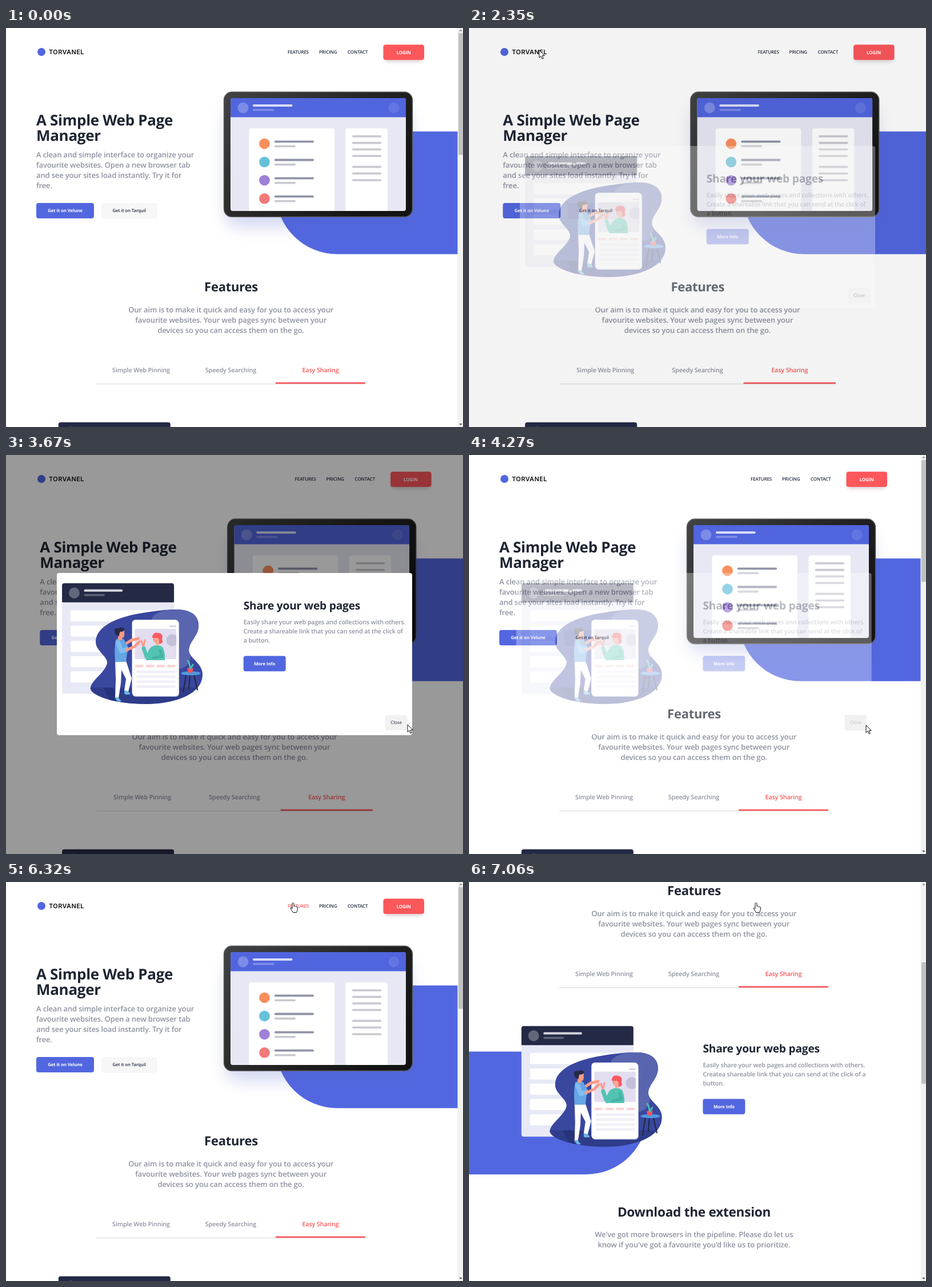
These frames come from a looping animation (800 px wide and 700 px high, 8000 ms). An HTML page:

```html
<!DOCTYPE html>
<html lang="en">
<head>
<meta charset="utf-8">
<title>Landing page demo</title>
<style>
html, body { margin: 0; width: 100%; height: 100%; overflow: hidden; background: #fff; }
svg { display: block; width: 800px; height: 700px; }
text { font-family: 'Open Sans', 'Noto Sans', sans-serif; font-weight: 600; letter-spacing: -.0115em; text-rendering: geometricPrecision; fill: #252b3f; }
.h { font-weight: 700; fill: #1e2533; }
.p { fill: #8f92a0; }
.w { fill: #fff; font-weight: 700; }
.mid { text-anchor: middle; }
.red { fill: #fa5757; }
.logo { font-family: Inter, sans-serif; letter-spacing: .4px; fill: #111; }
</style>
</head>
<body>
<svg id="stage" viewBox="0 0 800 700" xmlns="http://www.w3.org/2000/svg"></svg>
<script>
const BLUE = '#5267df', RED = '#fc575b', NAVY = '#242a45';
const stage = document.getElementById('stage');

const text = (x, y, s, size, cls = '', extra = '') =>
  `<text x="${x}" y="${y}" font-size="${size}" class="${cls}" ${extra}>${s}</text>`;
const lines = (x, y, gap, rows, size, cls) =>
  rows.map((s, i) => text(x, y + i * gap, s, size, cls)).join('');
const rect = (x, y, w, h, fill, r = 0, extra = '') =>
  `<rect x="${x}" y="${y}" width="${w}" height="${h}" rx="${r}" fill="${fill}" ${extra}/>`;
const bar = (x, y, w, h, fill, extra) => rect(x, y - h / 2, w, h, fill, h / 2.4, extra);
const dot = (x, y, r, fill, extra = '') => `<circle cx="${x}" cy="${y}" r="${r}" fill="${fill}" ${extra}/>`;
const path = (d, fill, extra = '') => `<path d="${d}" fill="${fill}" ${extra}/>`;
const limb = (d, color, w) =>
  path(d, 'none', `stroke="${color}" stroke-width="${w}" stroke-linecap="round" stroke-linejoin="round"`);

const BLOB = 'M59 103C59 80 85 64 125 55C150 50 178 46 200 46C226 46 240 57 239 76C238 93 222 103 222 118C223 132 246 140 246 160C246 188 215 204 175 210C140 214 100 211 72 201C56 195 48 188 50 182C54 168 78 154 79 139C79 128 59 118 59 103Z';

function tablet() {
  const items = ['#fa8f5c', '#66c0da', '#9f80d8', '#f27a78'].map((c, i) => {
    const y = 203 + i * 32.1;
    return dot(452.5, y, 9.3, c) + bar(470, y - 3.6, 69, 3.8, '#9194a6') + bar(470, y + 4.5, 37, 3.6, '#c8c8d0');
  }).join('');
  const side = [190, 201.6, 213, 224.5, 243.6, 255.2, 267].map(y => bar(606, y, 51, 3.6, '#c8c8d0')).join('');
  return rect(385, 140, 322, 208, '#5063c8', 20, 'opacity=".26" filter="url(#soft)"') +
    rect(381.5, 112.3, 330, 219, 'url(#frame)', 14, 'stroke="#5a5b5d" stroke-width="1.4"') +
    `<g clip-path="url(#screen)">` +
    rect(393, 123, 307, 198, '#e8e8f4') + rect(393, 123, 307, 33.5, '#5165de') +
    dot(415, 140, 9.5, '#fff', 'opacity=".25"') + dot(679, 140, 9.5, '#fff', 'opacity=".1"') +
    bar(432, 136, 69.5, 4, '#d9ddf9') + bar(432, 143.7, 37.5, 3.6, '#7f8de7') +
    rect(425.5, 176, 149.5, 160, '#fff', 4) + rect(594.5, 176, 73.5, 160, '#fff', 4) +
    items + side + '</g>';
}

function man() {
  return path('M93 136L112 136L122 167L116 190L109 188L112 168L104 152L103 175L99 201L93 200L94 168Z', '#fff') +
    path('M92 200l7 1l5 6q-6 2-9-2z', '#6ab4e8') + path('M109 188l7 2l4 4q-6 3-11 0z', '#6ab4e8') +
    limb('M112 106L121 100L134 97', '#fb9a86', 5) +
    path('M94 99Q101 94 108 98L116 112Q113 126 112 138L93 138Q91 115 94 99Z', '#64a5e6') +
    limb('M98 104L104 119L113 116', '#82bdf0', 8) + limb('M113 117L127 111L135 103', '#fb9a86', 5) +
    rect(98, 90, 7, 10, '#fb9a86', 3) + path('M97 83h12v9q-1 5-6 4q-6-2-6-8z', '#fb9a86') +
    path('M92 84Q91 78 98 79Q107 76 109 80Q110 85 102 85Q100 87 100 93Q93 92 92 84Z', '#252a45');
}

function woman() {
  return dot(193, 100, 10.5, '#c4c0da', 'clip-path="url(#photo)"') +
    path('M147 135Q149 117 157 111Q168 106 176 112Q181 121 180 135Z', '#52c3b2') +
    limb('M155 121L148 129L143 114', '#52c3b2', 7) + limb('M172 118L175 128L160 131', '#46b3a3', 5) +
    limb('M142 110L139 101M143 109L145 100', '#fb9a86', 3) +
    path('M160 95Q158 85 168 87Q178 88 175 98Q178 105 172 106Q164 108 160 100Z', '#fa5a62') +
    path('M161 96h9v11q-4 4-6 0v-3q-4 0-3-8z', '#fba792') +
    path('M158 96Q157 87 168 88Q176 90 173 99Q168 99 167 94Z', '#fa5a62');
}

function picture() {
  const slots = [47.3, 74.2, 101, 127.8, 154.6].map(y => rect(15, y, 166, 19.5, '#fff', 3)).join('');
  const tags = [128, 147, 165.5, 184].map(x => bar(x, 145.3, 14.5, 4.4, '#fbd3d5')).join('');
  const rows = [155.5, 164, 172.8, 181.3].map(y => bar(130, y, 69, 4.4, '#f1eff8')).join('');
  return rect(0, 0, 196, 194, '#e8e9f6', 4) +
    path('M0 33.5V4Q0 0 4 0H192Q196 0 196 4V33.5Z', NAVY) +
    dot(21.3, 17, 9.5, '#62677a') + bar(38.5, 12.8, 67.5, 4, '#d4d5db') + bar(38.5, 20.7, 36, 3.6, '#5e6377') + slots +
    `<g clip-path="url(#blob)">` + rect(40, 40, 215, 180, '#39479f') +
    path('M157 62C165 40 250 35 245 80C240 102 222 103 225 120C228 140 214 150 205 150L160 100Z', '#5965ae') +
    rect(40, 183, 215, 40, '#2e3c8a') + path('M72 183L88 183L104 206L84 206Z', '#26327a') + '</g>' +
    rect(123, 65, 82, 134, '#cfd0e6', 6) + rect(122.5, 64, 81.5, 133.5, '#fff', 6) +
    bar(188, 75.5, 12, 3.2, '#d9d6ea') + rect(127.5, 80, 72.5, 53, '#e2ddef', 1) +
    woman() + tags + rows + man() +
    limb('M217 161L212 191M224 161L222 184M231 161L237 187', NAVY, 2.2) +
    `<ellipse cx="225.5" cy="158" rx="17" ry="3.6" fill="#4f9ae2"/>` +
    path('M219 149h11l-2 8h-7z', '#f5565f') +
    limb('M224 149Q224 141 220 136M225 149Q228 145 229 143', '#4dbcae', 3);
}

const share = rows => `<use href="#pic"/>` + text(317.6, 46, 'Share your web pages', 19.2, 'h') +
  lines(317.6, 72.4, 15.8, rows, 10.75, 'p') +
  rect(317.6, 127.6, 74, 27, BLUE, 4) + text(354.6, 144.2, 'More Info', 7.8, 'w mid');

const defs = `<defs>
  <linearGradient id="frame" x1="0" y1="0" x2="1" y2=".6"><stop offset="0" stop-color="#424345"/><stop offset=".55" stop-color="#262626"/><stop offset="1" stop-color="#131313"/></linearGradient>
  <filter id="soft" x="-20%" y="-20%" width="140%" height="150%"><feGaussianBlur stdDeviation="14"/></filter>
  <filter id="small" x="-20%" y="-40%" width="140%" height="220%"><feGaussianBlur stdDeviation="3"/></filter>
  <clipPath id="screen"><rect x="393" y="123" width="307" height="198" rx="4"/></clipPath>
  <clipPath id="photo"><rect x="127.5" y="80" width="72.5" height="53"/></clipPath>
  <clipPath id="blob"><path d="${BLOB}"/></clipPath>
  <g id="pic">${picture()}</g></defs>`;

const NAV = [['FEATURES', 493, 38], ['PRICING', 548, 32], ['CONTACT', 598, 36]];
const TABS = ['Simple Web Pinning', 'Speedy Searching', 'Easy Sharing'];

const page = `<g id="page">
  ${dot(62, 42, 7, BLUE)}${text(75, 46.2, 'TORVANEL', 11, 'logo')}
  <g id="nav">${NAV.map(([s, x]) => text(x, 44.9, s, 8, 'link')).join('')}
    ${rect(663, 34, 66, 25, '#5a2030', 4, 'opacity=".22" filter="url(#small)"')}
    ${rect(660.5, 29.3, 71.5, 26.7, RED, 4, 'id="login"')}${text(696, 46, 'LOGIN', 8, 'mid w', 'id="loginText"')}</g>
  <g id="body">
    ${rect(472.5, 181.5, 600, 215.3, BLUE, 107.6)}${tablet()}
    ${lines(53, 170.5, 27, ['A Simple Web Page', 'Manager'], 26, 'h')}
    ${lines(53, 227, 18, ['A clean and simple interface to organize your', 'favourite websites. Open a new browser tab', 'and see your sites load instantly. Try it for', 'free.'], 13, 'p')}
    ${rect(53, 307, 101, 27, BLUE, 4)}${text(103.5, 322.7, 'Get it on Velune', 7.8, 'w mid')}
    ${rect(167, 307, 97.5, 28, '#f7f7f7', 4)}${text(215.7, 322.7, 'Get it on Tarquil', 7.8, 'mid')}
    ${text(394, 462, 'Features', 22, 'h mid')}
    ${lines(393.7, 498.8, 18, ['Our aim is to make it quick and easy for you to access your', 'favourite websites. Your web pages sync between your', 'devices so you can access them on the go.'], 13, 'p mid')}
    ${rect(-400, 736.6, 712.5, 215.3, BLUE, 107.6)}
    <g transform="translate(91.8 691.8)">${share(['Easily share your web pages and collections with others.', 'Createa shareable link that you can send at the click of a', 'button.'])}</g>
    ${text(394, 1026, 'Download the extension', 22.6, 'h mid')}
    ${lines(393.8, 1062, 18, ["We've got more browsers in the pipeline. Please do let us", "know if you've got a favourite you'd like us to prioritize."], 13, 'p mid')}
  </g>
  ${rect(158, 624, 471, 1, '#d6d6db', 0, 'id="rule"')}${rect(472, 621.6, 157, 2.6, RED, 0, 'id="active"')}
  ${TABS.map((s, i) => text(0, 604.4, s, 10.8, 'tab mid ' + (i == 2 ? 'red' : 'p'))).join('')}
</g>`;

const scrollbar = `<g id="scrollbar">${rect(790.5, 0, 10, 700, '#f1f1f1')}${rect(792, 9, 8, 213.5, '#c1c1c1', 0, 'id="thumb"')}
  ${path('M793.3 5.6L796 2.6L798.7 5.6Z', '#8a8a8a')}${path('M793.3 694L796 697L798.7 694Z', '#505050')}</g>`;

const modal = `<g id="modal">${rect(82.7, 207, 622, 284.5, '#fff', 4)}
  <g transform="translate(91.8 225)">${share(['Easily share your web pages and collections with others.', 'Create a shareable link that you can send at the click of', 'a button.'])}</g>
  ${rect(657.4, 456, 38.8, 27, '#f2f2f2', 4, 'id="close"')}${text(676.8, 472, 'Close', 8, 'mid', 'style="font-weight:400"')}</g>`;

const pointers = `<g id="cursor" stroke="#111" stroke-width="1" stroke-linejoin="round">
  ${path('M0 0V13L3 10.2L5 15.2L7.2 14.3L5.2 9.5H9.2Z', '#fff', 'id="arrow"')}
  ${path('M-1.5 1Q0-1 1.5 1V6q1.6-.9 2.5.5q1.5-.7 2.3.7q1.7-.3 1.7 1.5V12L6 17H0L-4 10.5Q-4.5 8.5-3 8.8L-1.5 10Z', '#fff', 'id="hand"')}</g>`;

stage.innerHTML = defs + page + scrollbar + rect(0, 0, 800, 700, '#000', 0, 'id="shade"') + modal + pointers;

const $ = id => document.getElementById(id);
const set = (id, attrs) => { for (const k in attrs) $(id).setAttribute(k, attrs[k]); };
const links = document.querySelectorAll('.link'), tabs = document.querySelectorAll('.tab');

const ramp = (t, a, b) => Math.min(1, Math.max(0, (t - a) / (b - a)));
const smooth = p => p * p * (3 - 2 * p);
const cubic = p => p < .5 ? 4 * p ** 3 : 1 - 4 * (1 - p) ** 3;

// start, end, bend point, end point
const MOVES = [
  [140, 990, 820, 400, 622, 152],
  [1290, 2210, 400, 70, 123, 39],
  [2930, 3670, 810, 300, 703, 473],
  [3700, 3940, 699, 478, 695, 474],
  [4270, 4880, 650, 240, 612, 37],
  [4920, 5300, 560, 48, 503, 42],
  [5340, 5700, 550, 46, 605, 40],
  [5720, 5960, 650, 36, 690, 39],
  [5980, 6310, 600, 42, 502.5, 36.5]
];

function pointerAt(t) {
  let x = 525, y = 704;
  for (const [a, b, cx, cy, ex, ey] of MOVES) {
    if (t < a) break;
    const p = smooth(ramp(t, a, b)), q = 1 - p;
    x = q * q * x + 2 * p * q * cx + p * p * ex;
    y = q * q * y + 2 * p * q * cy + p * p * ey;
  }
  return [x, y];
}

function render(t) {
  const wide = t >= 2280 && t < 4200, dx = wide ? 6.3 : 0;
  const scroll = 439 * cubic(ramp(t, 6593, 7060));
  const [x, y] = pointerAt(t);

  set('page', { transform: `translate(0 ${-scroll})` });
  set('body', { transform: `translate(${dx} 0)` });
  set('nav', { transform: `translate(${dx * 2} 0)` });
  set('modal', { transform: `translate(${dx} 0)` });

  const col = wide ? 161.3 : 157;
  tabs.forEach((el, i) => el.setAttribute('x', 158 + col * (i + .5)));
  set('rule', { width: col * 3 });
  set('active', { x: 158 + col * 2, width: col });

  set('scrollbar', { visibility: wide ? 'hidden' : 'visible' });
  set('thumb', { y: 9 + scroll * .3 });

  const open = ramp(t, 2280, 2510);
  const fade = open * (1 - ramp(t, 4120, 4340));
  set('shade', { opacity: .4 * open ** 1.8 * (1 - ramp(t, 4110, 4240)) });
  set('modal', { opacity: fade, visibility: fade > 0 ? 'visible' : 'hidden' });
  set('close', { fill: t > 3800 ? '#d5d5d7' : '#f2f2f2' });

  const inNav = y > 33 && y < 50 && scroll < 10;
  const over = ([, left, w]) => inNav && x >= left && x <= left + w;
  links.forEach((el, i) => el.classList.toggle('red', over(NAV[i])));
  const onLogin = inNav && x > 660 && x < 732;
  set('login', { fill: onLogin ? '#fff' : RED, stroke: onLogin ? RED : 'none' });
  set('loginText', { class: onLogin ? 'mid red' : 'mid w' });

  const hand = t > 6200 || onLogin || NAV.some(over);
  set('cursor', { transform: `translate(${x} ${y})` });
  set('hand', { visibility: hand ? 'visible' : 'hidden' });
  set('arrow', { visibility: hand ? 'hidden' : 'visible' });
}

const begin = performance.now();
function tick() {
  render((performance.now() - begin) % 8000);
  requestAnimationFrame(tick);
}
tick();
</script>
</body>
</html>
```
